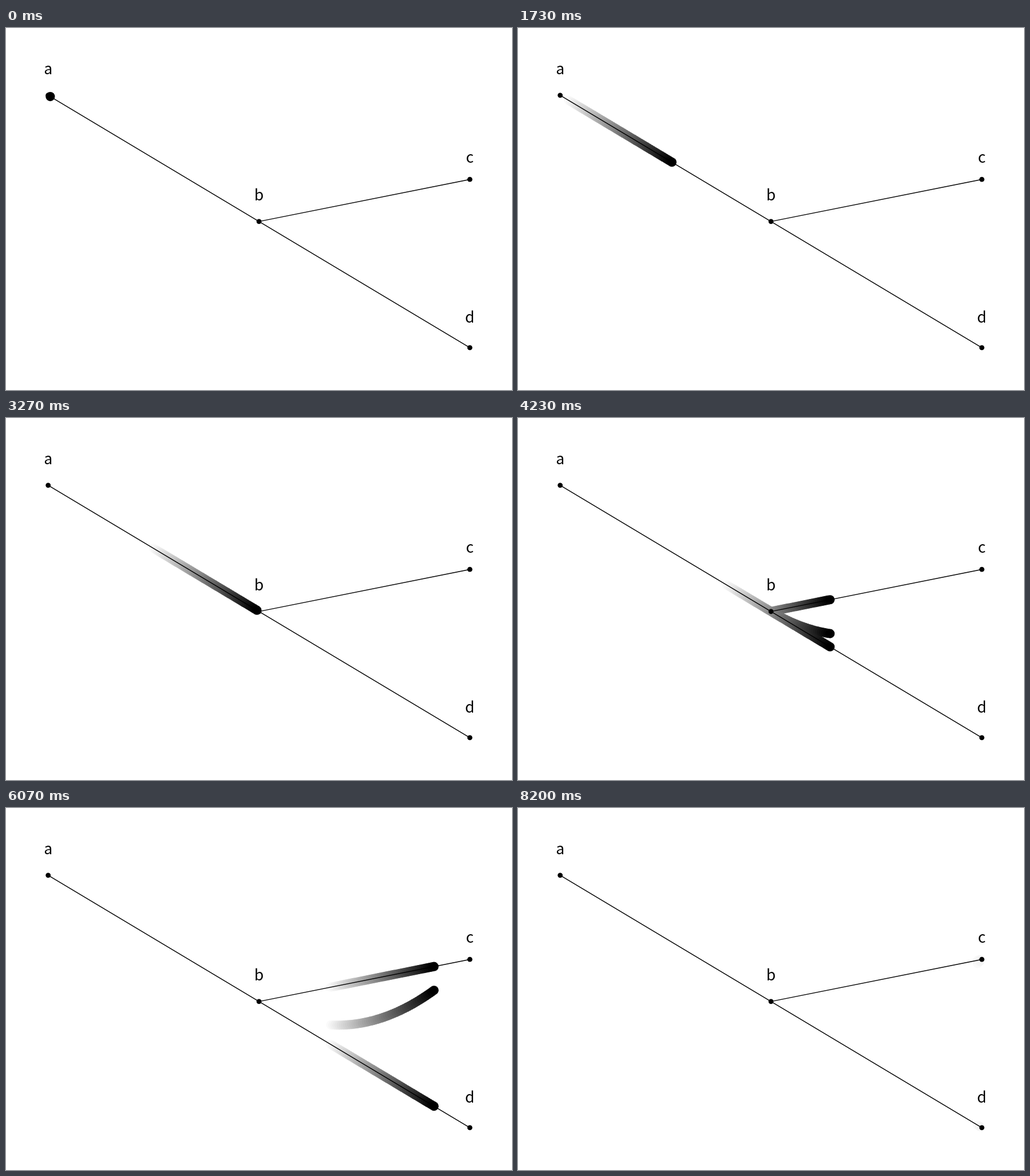
These frames come from a looping animation (884x634 px, 8330 ms). An HTML page with a canvas:

```html
<!DOCTYPE html>
<html lang="en">
<head>
<meta charset="utf-8">
<title>Branching paths</title>
<style>
  html, body { margin: 0; width: 100%; height: 100%; overflow: hidden; background: #fff; }
  canvas { display: block; }
</style>
</head>
<body>
<canvas id="stage" width="884" height="634"></canvas>
<script>
const ctx = document.getElementById('stage').getContext('2d');
const SCALE = 884 / 600;
const LOOP = 8330;      // ms
const FPS = 30;
const HALF = 100;       // samples from a to b, and from b to the ends
const LAST = 199;       // final sample of the walk
const TRAIL = 50;       // samples until a mark has faded out

const nodes = {
  a: { x: 50, y: 80, label: 55 },
  b: { x: 300, y: 230, label: 205 },
  c: { x: 550, y: 180, label: 160 },
  d: { x: 550, y: 380, label: 350 }
};
const { a, b, c, d } = nodes;

const mix = (p, q, u) => ({ x: p.x + (q.x - p.x) * u, y: p.y + (q.y - p.y) * u });

function dot(p, r) {
  ctx.beginPath();
  ctx.arc(p.x, p.y, r, 0, 2 * Math.PI);
  ctx.fill();
}

function line(p, q) {
  ctx.beginPath();
  ctx.moveTo(p.x, p.y);
  ctx.lineTo(q.x, q.y);
  ctx.stroke();
}

// Up to b there is one path; after it, both branches and their blend.
function places(n) {
  if (n <= HALF) return [mix(a, b, n / HALF)];
  const u = n / HALF - 1;
  const up = mix(b, c, u), down = mix(b, d, u);
  return [up, down, mix(down, up, u)];
}

// Tick number on a 10 ms clock; the fade-out advances four ticks at a time.
function tick(ms) {
  const k = Math.floor((Math.floor(ms / 10) * 10 + 3.4) * FPS / 1000);
  const end = LAST - 1;
  return k <= end ? k : end + 4 * Math.floor((k - end) / 4);
}

function draw(ms) {
  const now = tick(ms) + 1;
  ctx.setTransform(1, 0, 0, 1, 0, 0);
  ctx.fillStyle = '#fff';
  ctx.fillRect(0, 0, 884, 634);
  ctx.scale(SCALE, SCALE);

  for (let n = Math.max(1, now - TRAIL + 1); n <= Math.min(now, LAST); n++) {
    const grey = Math.round(255 * (now - n) / TRAIL);
    ctx.fillStyle = `rgb(${grey},${grey},${grey})`;
    places(n).forEach(p => dot(p, 5.5));
  }

  ctx.fillStyle = ctx.strokeStyle = '#000';
  ctx.lineWidth = 1;
  line(a, b);
  line(b, c);
  line(b, d);

  ctx.font = '18px "Noto Sans CJK JP", "Noto Sans CJK SC", "Noto Sans CJK", sans-serif';
  ctx.textAlign = 'center';
  for (const name in nodes) {
    const p = nodes[name];
    dot(p, 3);
    ctx.fillText(name, p.x, p.label);
  }
}

const start = performance.now();
function frame() {
  draw((performance.now() - start) % LOOP);
  requestAnimationFrame(frame);
}
frame();
</script>
</body>
</html>
```
